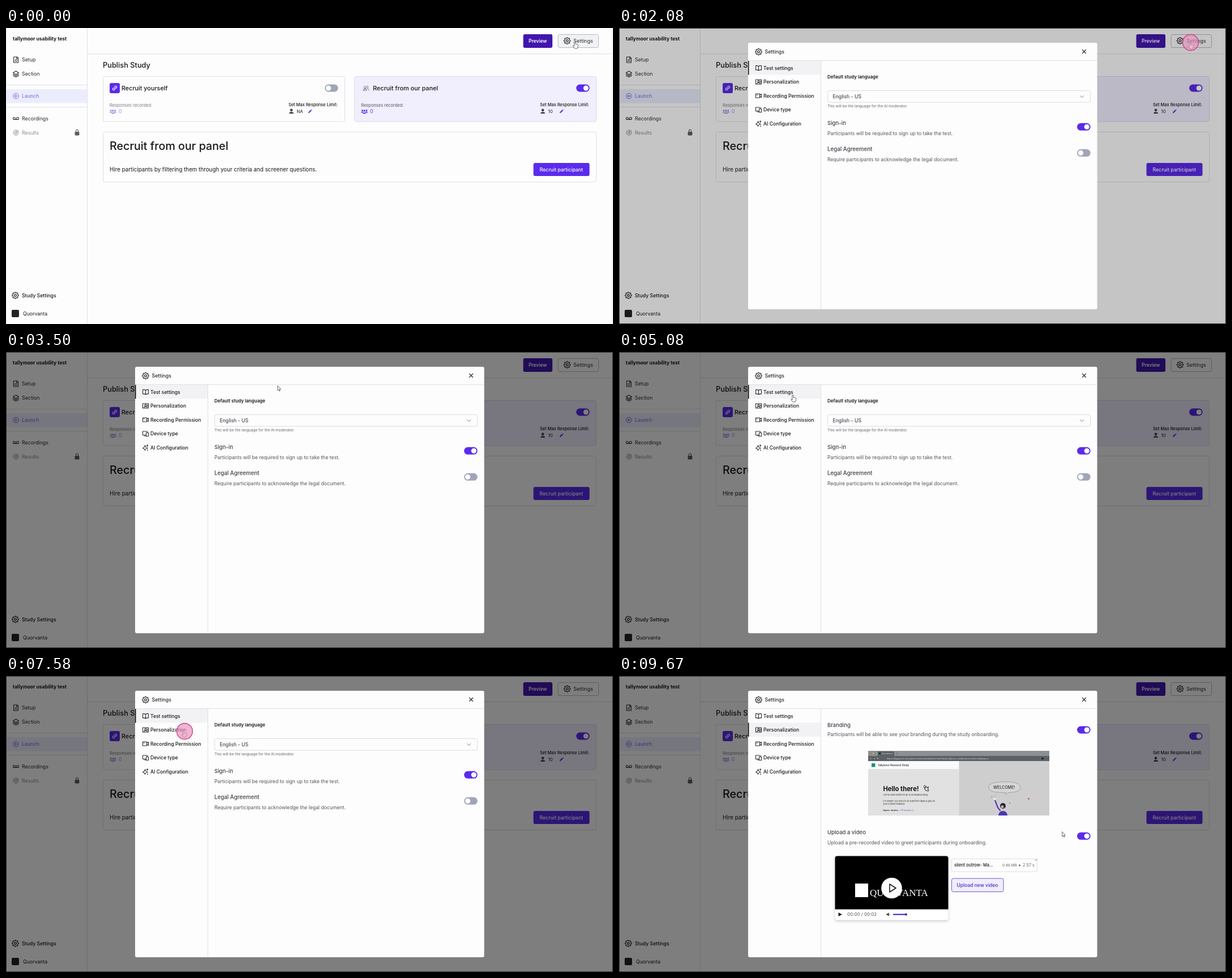
Write an HTML page with a canvas that moves like this. It is 1072 px wide and 522 px high and loops after 9.75 s.

```html
<!DOCTYPE html>
<html lang="en">
<head>
<meta charset="utf-8">
<title>Study settings</title>
<style>
html, body { margin: 0; width: 100%; height: 100%; overflow: hidden; background: #fdfdfd; }
canvas { display: block; width: 1072px; height: 522px; }
</style>
</head>
<body>
<canvas id="stage" width="1072" height="522"></canvas>
<script>
const ctx = document.getElementById('stage').getContext('2d');
const LOOP = 9750, STEP = 250 / 3;
const INK = '#18181c', NAV = '#2b2b31', SOFT = '#55555e', LINE = '#dfe0e5';
const PURPLE = '#5b2bec', PAPER = '#fdfdfd';
const clamp = v => Math.max(0, Math.min(1, v));

// y is the middle of the capitals
function text(s, x, y, size, color = INK, weight = 400, family = 'Inter, sans-serif') {
  ctx.font = `${weight} ${size}px ${family}`;
  ctx.fillStyle = color;
  ctx.fillText(s, x, y + size * 0.36);
}

function rect(x, y, w, h, fill) {
  ctx.fillStyle = fill;
  ctx.fillRect(x, y, w, h);
}

// A stroke stays inside the given edges
function box(x, y, w, h, r, fill, stroke) {
  const inset = stroke ? 0.5 : 0;
  ctx.beginPath();
  ctx.roundRect(x + inset, y + inset, w - 2 * inset, h - 2 * inset, r);
  paint(fill, stroke, 1);
}

function paint(fill, stroke, width) {
  if (fill) { ctx.fillStyle = fill; ctx.fill(); }
  if (stroke) { ctx.strokeStyle = stroke; ctx.lineWidth = width; ctx.stroke(); }
}

function disc(x, y, r, fill, stroke, width = 1) {
  ctx.beginPath();
  ctx.arc(x, y, r, 0, Math.PI * 2);
  paint(fill, stroke, width);
}

// Draws a path centred on (x, y); k is its scale
function shape(d, x, y, k, fill, stroke, width = 1) {
  ctx.save();
  ctx.translate(x, y);
  ctx.scale(k, k);
  ctx.lineJoin = ctx.lineCap = 'round';
  const p = new Path2D(d);
  if (fill) { ctx.fillStyle = fill; ctx.fill(p); }
  if (stroke) { ctx.strokeStyle = stroke; ctx.lineWidth = width / k; ctx.stroke(p); }
  ctx.restore();
}

const ICON = {
  file: 'M2-5H-4V5H4V-3zM1-5V-2H4M-2 0H2M-2 2.5H2',
  layers: 'M0-5L-5-2 0 1 5-2zM-5 .5L0 3.3 5 .5M-5 3L0 5.6 5 3',
  tape: 'M-1 0a2 2 0 1 1-4 0 2 2 0 1 1 4 0M5 0a2 2 0 1 1-4 0 2 2 0 1 1 4 0M-3 2H3',
  play: 'M-1.5-2.2L2.3 0-1.5 2.2z',
  link: 'M-.8 1.2L1.2-.8M-.5-2L1-3.4A1.8 1.8 0 0 1 3.5-1L2 .5M.5 2L-1 3.4A1.8 1.8 0 0 1-3.5 1L-2-.5',
  person: 'M2.4-2.2a2.4 2.4 0 1 1-4.8 0 2.4 2.4 0 1 1 4.8 0M-4 4Q-4 1 0 1T4 4z',
  pencil: 'M-4 4L-3.2 1.2 1.5-3.5 3.5-1.5-1.2 3.2zM2.2-4.2L3-4.8 4.8-3 4.2-2.2z',
  book: 'M0-3V4.5M0-3Q-2-4.5-5-4V3.5Q-2 3 0 4.5 2 3 5 3.5V-4Q2-4.5 0-3',
  card: 'M-5-4H5V4H-5zM-3 4Q-2.5 1 0 1T3 4M1.6-1a1.6 1.6 0 1 1-3.2 0 1.6 1.6 0 1 1 3.2 0M3.5-2V1',
  camera: 'M-5-3.5H2V3.5H-5zM2-1L5-3V3L2 1M-3.5-1.5H-2',
  device: 'M3-2V-4H-5V2.5H0M-2.5 4H0M1-1.5H5V4.5H1z',
  spark: 'M-1-4Q-.5 0 4 1-.5 2-1 5-1.5 2-5 1-1.5 0-1-4M3-5V-2M1.5-3.5H4.5M3.5 3.5V5.5',
  hand: 'M-2.6-5.2a1.1 1.1 0 0 1 2.2 0v3.4l3.6.8q1.4.4 1.2 2l-.6 3.2-.8 1.8h-4.6l-3-3.6q-.6-1.4 1-1.2l1 .8z',
  arrow: 'M-2.5-6V4L0 2 1.4 5.6 3 5 1.5 1.5H4.2z'
};
const line = (name, x, y, color = NAV, width = 1.1) => shape(ICON[name], x, y, 1, null, color, width);

function gear(x, y, r, color = NAV) {
  ctx.beginPath();
  for (let i = 0; i < 32; i++) {
    const a = (i - 0.5) * Math.PI / 16, q = i % 4 < 2 ? r : r * 0.77;
    ctx.lineTo(x + q * Math.cos(a), y + q * Math.sin(a));
  }
  ctx.closePath();
  ctx.lineJoin = 'round';
  paint(null, color, 1.2);
  disc(x, y, r * 0.33, null, color, 1.2);
}

function toggle(x, y, on) {
  box(x, y - 6.5, 23.6, 13, 6.5, on ? PURPLE : '#a0a5b8');
  disc(on ? x + 17.2 : x + 6.4, y, 4.6, '#fff');
}

function crowd(x, y, color) {
  for (const dx of [-3.8, 3.8]) shape(ICON.person, x + dx, y - 0.2, 0.6, color);
  shape(ICON.person, x, y + 0.8, 0.85, color, '#f8f6fe', 0.5);
}

function sidebar() {
  rect(143, 0, 1, 522, LINE);
  rect(0, 0, 1, 522, '#e8e8ec');
  rect(0, 100, 143, 1, LINE);
  rect(0, 139, 143, 1, LINE);
  rect(1, 108, 142, 24.5, '#ebedfd');
  text('tallymoor usability test', 12, 19, 8.5, INK, 700);
  line('file', 17.5, 56);
  text('Setup', 28, 56, 8.9, NAV);
  line('layers', 17.5, 81);
  text('Section', 28, 81, 8.9, NAV);
  disc(17.5, 120, 4.7, null, '#7562e6');
  shape(ICON.play, 17.7, 120, 0.8, null, '#7562e6');
  text('Launch', 28, 120, 8.8, '#7562e6');
  line('tape', 17.5, 159.5);
  text('Recordings', 28, 159.5, 8.8, NAV);
  disc(17.5, 184.5, 4.5, null, '#898990');
  disc(17.5, 184.5, 2, null, '#898990');
  shape('M0 0L4-4', 17.5, 184.5, 1, null, '#898990');
  text('Results', 28, 184.5, 8.8, '#8b8b92');
  box(121.5, 183, 8, 6.5, 1, '#5c5c64', '#5c5c64');
  shape('M-2 0V-2A2 2 0 0 1 2-2V0', 125.5, 183, 1, null, '#5c5c64', 1.2);
  gear(16.5, 471.5, 5.8);
  text('Study Settings', 28, 471.5, 8.7, INK, 500);
  box(10, 497, 13, 13, 2, '#222226');
  text('Quorvanta', 30, 504, 8.7, INK);
}

function studyCard(x, w, title, limit, on) {
  box(x, 85, w, 80.5, 3, on ? '#f1eefd' : PAPER, on ? '#dcd8ef' : LINE);
  text(title, x + 33, 106, 10.8, INK, 500);
  toggle(x + w - 36, 106, on);
  text('Responses recorded:', x + 12, 136, 7.5, on ? '#55555f' : '#7d7d86');
  const tone = on ? PURPLE : '#9c87f2';
  crowd(x + 18, 147, tone);
  text('0', x + 28, 147, 8.6, tone);
  const r = x + w - 100;
  text('Set Max Response Limit:', r, 135.5, 7.4, INK, 500);
  shape(ICON.person, r + 5, 147, 1, '#44444c');
  text(limit, r + 14.5, 147, 7.7, INK);
  shape(ICON.pencil, r + 38, 147, 0.8, PURPLE);
}

function page(hover) {
  rect(0, 0, 1072, 522, PAPER);
  sidebar();
  rect(144, 45, 926, 1, LINE);
  rect(1070, 0, 1, 522, '#e6e6ea');
  box(913.5, 11, 51.5, 24, 3, '#4116ae');
  text('Preview', 923, 22.5, 8.4, '#fff', 600);
  box(974.5, 11, 72.5, 24, 3, hover ? '#f0f2f4' : PAPER, '#b5b9c2');
  gear(991, 22.5, 5.8);
  text('Settings', 1002, 22.5, 9, NAV);
  text('Publish Study', 171, 65, 12.8, INK, 500);
  studyCard(171, 428, 'Recruit yourself', 'NA', false);
  studyCard(615, 428, 'Recruit from our panel', '10', true);
  box(183, 97, 18, 18, 3, PURPLE);
  line('link', 192, 106, '#fff');
  shape(ICON.person, 634, 106.5, 0.8, null, '#55555f', 0.8);
  shape('M1-4A2 2 0 0 1 1 0M2 1Q4.5 1.5 4.5 3.5', 636.5, 106, 1, null, '#55555f', 0.8);
  box(171, 183, 872, 89, 3, PAPER, LINE);
  text('Recruit from our panel', 183, 208, 19.7, INK, 500);
  text('Hire participants by filtering them through your criteria and screener questions.', 183, 249, 9.8, INK);
  box(931.5, 238, 99, 23, 3, PURPLE);
  text('Recruit participant', 942.5, 249.5, 8.7, '#fff', 500);
}

function testSettings() {
  text('Default study language', 368, 86.5, 8, INK, 600);
  box(368, 110, 465, 21.5, 3, PAPER, '#d8dbe4');
  text('English - US', 377.5, 120.5, 8.7, NAV);
  shape('M-3-1.5L0 1.5 3-1.5', 817.5, 121, 1, null, '#77777f');
  text('This will be the language for the AI moderator.', 368, 138, 6.5, '#66666f');
  text('Sign-in', 368, 167.5, 9.6, '#3f3f48', 500);
  text('Participants will be required to sign up to take the test.', 368, 185.5, 8.65, SOFT);
  toggle(809, 174.3, true);
  text('Legal Agreement', 368, 213.5, 9.75, '#3f3f48', 500);
  text('Require participants to acknowledge the legal document.', 368, 231.5, 8.65, SOFT);
  toggle(809, 220.3, false);
}

function browserShot() {
  const bar = '#5c6165', pale = '#dcdcdc';
  rect(440, 132, 320, 9, '#8b9094');
  rect(457, 133, 29, 8, bar);
  ['#e0574f', '#e3b341', '#52ad55'].forEach((c, i) => disc(445 + i * 4, 136.5, 1.3, c));
  rect(459, 135, 3, 3, '#26262b');
  text('Quorvanta', 464, 136.7, 3.4, pale);
  text('×', 481, 136.7, 4, pale);
  text('+', 489.5, 136.7, 4, '#222');
  rect(440, 141, 320, 9, bar);
  text('←  →  ⟳', 443, 145.5, 4, pale);
  text('https://playground.quorvanta.co/en/moderated/test/invite?study=tallymoor_test&session=welcome&lang=en', 473, 145.5, 3.5, pale);
  disc(748, 145.5, 2, '#26262b');
  rect(440, 150, 160.5, 96, '#e1e1e1');
  rect(440, 150, 160.5, 14, '#fafafa');
  rect(600.5, 150, 159.5, 96, '#cecece');
  rect(446, 154, 6.5, 6.5, '#239277');
  text('Tallymoor Research Study', 457, 157, 4.4, '#222', 500);
  text('Hello there!', 466.5, 198.5, 11.2, '#151518', 700);
  shape('M-4-2L-1 4Q4 5 4 0V-4L2-1-1-5-1.5-1-4-3M-5-5Q-4-6-2-6M5 3Q5 5 3 6', 542.5, 198.5, 0.9, null, '#222');
  text("You've been invited to an AI moderated study", 466.5, 210, 3.7, '#333');
  text("It's simple! You need to do a perform tasks & give us", 466.5, 220.5, 3.7, '#333');
  text('your honest feedback', 466.5, 225.5, 3.7, '#333');
  text('Approx. duration', 466.5, 237, 3.3, '#222', 600);
  text('~10 minutes ⓘ', 496, 237, 3.5, '#5b45c8');
  shape('M0-10C17-10 28-7 28 0S17 9 6 9L2 13V9C-18 9-28 7-28 0S-17-10 0-10z', 681, 196.5, 1, '#d6d6d6', '#8a8a90', 0.7);
  text('WELCOME!', 661, 196.5, 7, '#333', 500);
  shape('M-10-13L-5 0-1 5', 674, 232, 1, null, '#5140b5', 2.2);
  disc(663.5, 217, 2, '#eeeeee');
  shape('M-8 10Q-7 2 0 2T8 10z', 678, 236, 1, '#4a37b2');
  disc(678, 229, 5, '#242044');
  disc(677, 230.5, 2.6, '#d9a08a');
  shape('M-4 0V-5M2-2L5-6', 661, 215, 0.7, null, '#8a8a90', 0.7);
  disc(723.5, 216.5, 1.4, '#d0524c');
  disc(690, 224, 1, '#d0524c');
}

function videoCard() {
  ctx.save();
  ctx.shadowColor = 'rgba(0,0,0,.2)';
  ctx.shadowBlur = 5;
  ctx.shadowOffsetY = 2;
  box(381.5, 317.5, 200, 113, 4, '#fff');
  ctx.restore();
  box(381.5, 317.5, 200, 94, [4, 4, 0, 0], '#000');
  rect(417, 366, 23, 24, '#fff');
  text('QUORVANTA', 443, 381.5, 17, '#fff', 400, '"Liberation Serif", serif');
  disc(481.5, 374, 18.3, '#fff');
  shape('M-4-7L7 0-4 7z', 482, 374, 1, null, '#18181c', 1.6);
  shape('M-3-3.5L3.5 0-3 3.5z', 390.5, 420.5, 1, '#222');
  text('00:00 / 00:02', 403, 420.5, 8, SOFT);
  shape('M-4-1.5H-2L1-3.5V3.5L-2 1.5H-4zM2.5-2Q4 0 2.5 2', 476, 420.5, 0.9, '#44444c');
  rect(484, 419.5, 23, 2, '#3e1bb0');
  disc(507, 420.5, 1.9, '#3e1bb0');
}

function personalization() {
  text('Branding', 368, 87, 9.5, '#3f3f48', 500);
  text('Participants will be able to see your branding during the study onboarding.', 368, 103, 8.65, SOFT);
  toggle(809, 95, true);
  browserShot();
  text('Upload a video', 368, 276, 9.5, '#3f3f48', 500);
  text('Upload a pre-recorded video to greet participants during onboarding.', 368, 294, 8.6, SOFT);
  toggle(809, 282.3, true);
  videoCard();
  box(587, 322, 152, 23.5, 3, PAPER, LINE);
  text('silent outrow- Ma...', 592, 333, 7.4, INK, 500);
  text('0.46 MB', 677, 333.5, 6.5, '#66666f');
  disc(707.5, 334, 1.4, '#55555f');
  text('2.57 s', 713, 333, 7.3, '#66666f');
  shape('M-2 0L-.5 1.5 2.5-1.5', 736.5, 324, 1, null, '#4b9b7d');
  box(587, 356.5, 92.5, 24.5, 3, '#f0edfd', '#7258cf');
  text('Upload new video', 596.5, 368.5, 8.5, '#4f2fc4', 500);
}

const TABS = [['Test settings', 'book'], ['Personalization', 'card'], ['Recording Permission', 'camera'],
  ['Device type', 'device'], ['AI Configuration', 'spark']];

function modal(tab, icons) {
  box(228, 26, 616.5, 470, 3, PAPER);
  gear(246.5, 42, 5.8);
  text('Settings', 257.5, 42, 8.8, NAV, 500);
  shape('M-3-3L3 3M3-3L-3 3', 821.5, 41.5, 1, null, NAV, 1.2);
  rect(228, 57, 616.5, 1, LINE);
  rect(356, 58, 1, 438, LINE);
  const top = 58 + tab * 24.5;
  rect(228, top, 128, 24.5, '#f2f2f4');
  rect(228, top, 1.5, 24.5, '#111');
  TABS.forEach(([name, icon], i) => {
    const y = 70.5 + i * 24.5;
    if (icons) line(icon, 246.5, y);
    text(name, 255, y, 8.6, INK, 500);
  });
  (tab ? personalization : testSettings)();
}

// Pointer path: time, x, y
const PATH = [[0, 1006, 30], [80, 1006, 30], [250, 1006, 30.5], [420, 1006, 30.5], [830, 1010, 31],
  [2830, 1010, 31], [3830, 301, 76], [4340, 301, 76], [5080, 308.5, 82], [6250, 308.5, 82],
  [7170, 315, 102], [8590, 315, 102], [9800, 801, 286]];

function pointer(t) {
  const i = PATH.findIndex(p => p[0] > t);
  const [t0, x0, y0] = PATH[i - 1], [t1, x1, y1] = PATH[i];
  const u = (t - t0) / (t1 - t0), s = u * u * (3 - 2 * u);
  const x = x0 + (x1 - x0) * s, y = y0 + (y1 - y0) * s;
  const onLink = x > 975 || x < 356;
  shape(onLink ? ICON.hand : ICON.arrow, x, y, onLink ? 1 : 0.8, '#fff', '#44444c', 0.8);
}

function click(t, start, x, y) {
  const d = t - start;
  if (d < 0 || d > 500) return;
  ctx.globalAlpha = clamp(2 - d / 250);
  disc(x, y, 14, 'rgba(232,146,188,.66)', '#cb4489', 1.4);
  ctx.globalAlpha = 1;
}

function draw(t) {
  const open = t > 1990;
  page(t < 2075);
  rect(0, 0, 1072, 522, `rgba(0,0,0,${Math.min(0.5, clamp((t - 2000) / 375))})`);
  if (open) modal(t > 7660 ? 1 : 0, t > 2075);
  if (open) box(0, 0, 1072, 522, 0, null, '#2a2a2a');
  pointer(t);
  click(t, 1916, 1009.5, 25.5);
  click(t, 7583, 315.5, 97.5);
}

const begin = performance.now();
function tick() {
  const t = (performance.now() - begin) % LOOP;
  draw(Math.floor((t + 5) / STEP) * STEP);
  requestAnimationFrame(tick);
}
tick();
</script>
</body>
</html>
```
